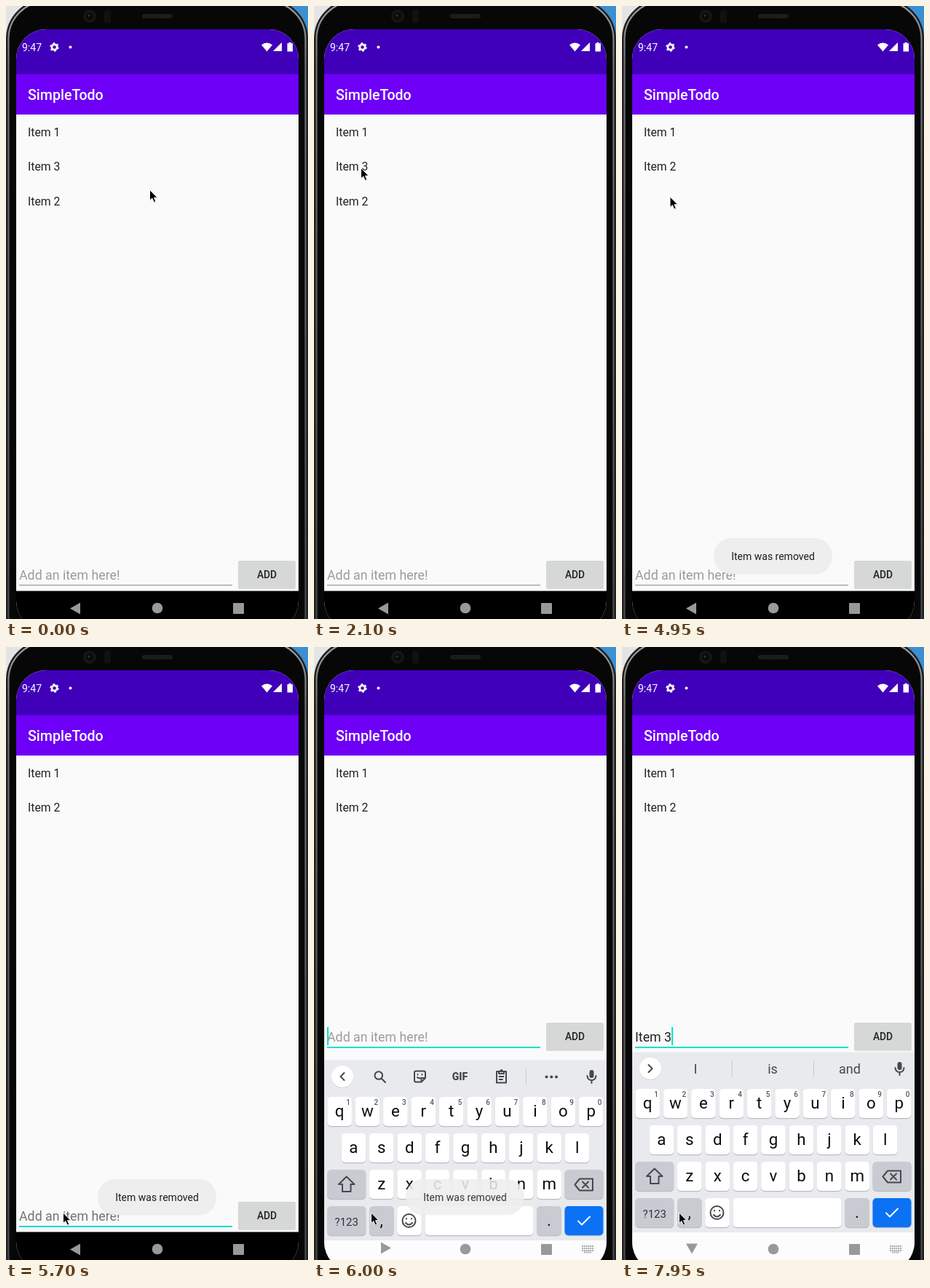
An HTML page for the animation above (8000 ms loop, 415 by 842 pixels).

```html
<!DOCTYPE html>
<html lang="en">
<head>
<meta charset="utf-8">
<title>Todo list demo</title>
<style>
  html, body { margin: 0; width: 100%; height: 100%; overflow: hidden; background: #0a0a0b; }
  svg { display: block; width: 415px; height: 842px; font-family: Roboto, "Noto Sans", sans-serif; }
  text { white-space: pre; }
  .line { fill: none; stroke: #45484c; stroke-width: 2; stroke-linejoin: round; stroke-linecap: round; }
  .mid { text-anchor: middle; }
  .row { font-size: 15.8px; fill: #212121; }
  .field { font-size: 17.8px; }
  .letter { font-size: 22.3px; fill: #0c0c0d; }
</style>
</head>
<body>
<svg viewBox="0 0 415 842">
  <defs>
    <clipPath id="screen"><rect x="14" y="32" width="388" height="826" rx="41"/></clipPath>
    <linearGradient id="desk" x1="0" x2="1" y1="0" y2="0">
      <stop offset=".5" stop-color="#e4e4e4"/><stop offset=".5" stop-color="#3c8fd0"/>
    </linearGradient>
    <linearGradient id="rim" x1="0" x2="0" y1="0" y2="1">
      <stop offset="0" stop-color="#a5a5a5"/><stop offset=".1" stop-color="#737577"/>
      <stop offset="1" stop-color="#46484b"/>
    </linearGradient>
    <linearGradient id="shade" x1="0" x2="0" y1="0" y2="1">
      <stop offset="0" stop-color="#000" stop-opacity=".09"/><stop offset="1" stop-color="#000" stop-opacity="0"/>
    </linearGradient>
  </defs>

  <!-- phone body -->
  <rect width="415" height="842" fill="url(#desk)"/>
  <rect x="413" y="835" width="2" height="7" fill="#b0409a"/>
  <rect x="1.5" y="-8" width="412" height="920" rx="53" fill="#0a0a0b" stroke="#1d1f21" stroke-width="3"/>
  <rect x="3.5" y="-6" width="408" height="916" rx="51" fill="none" stroke="url(#rim)" stroke-width="2"/>
  <rect x="7" y="-3" width="401" height="910" rx="48" fill="#070707"/>
  <circle cx="115" cy="14" r="9" fill="#151516"/>
  <circle cx="115" cy="14" r="5" fill="#0a0a0a"/>
  <circle cx="114" cy="13" r="1.5" fill="#333634"/>
  <rect x="135" y="5" width="9" height="18" rx="4" fill="#111112"/>
  <rect x="187" y="11" width="42" height="6" rx="3" fill="#1e1e1e"/>
  <path d="M190 14H227" stroke="#121212" stroke-width="4" stroke-dasharray="1 3"/>

  <g clip-path="url(#screen)">
    <rect x="14" y="32" width="388" height="826" fill="#fafafa"/>
    <rect x="14" y="32" width="388" height="62" fill="#4000ba"/>
    <rect x="14" y="93.500" width="388" height="55.500" fill="#6e00f7"/>
    <rect x="14" y="149" width="388" height="3" fill="url(#shade)"/>
    <text x="22" y="62" font-size="14" fill="#fff">9:47</text>
    <g fill="none" stroke="#fff">
      <circle cx="66.500" cy="56.500" r="3.600" stroke-width="2.600"/>
      <circle cx="66.500" cy="56.500" r="5.200" stroke-width="2" stroke-dasharray="2.700 2.745"/>
    </g>
    <circle cx="88.500" cy="56.500" r="2" fill="#fff"/>
    <g fill="#fff">
      <path d="M351 53.500Q358.500 47.500 366 53.500L358.500 62.500Z"/>
      <path d="M379 50V62H367Z"/>
      <path d="M388.500 50H391.500V51.300H394V62.500H386.500V51.300H388.500Z"/>
    </g>
    <text x="30" y="129" font-size="19.600" font-weight="500" fill="#fff">SimpleTodo</text>

    <text class="row" x="30" y="178.700">Item 1</text>
    <text class="row" x="30" y="226.200" id="removed">Item 3</text>
    <text class="row" x="30" id="lower">Item 2</text>

    <rect id="navDark" x="14" y="803.500" width="388" height="55" fill="#000"/>

    <g id="entry">
      <text class="field" id="hint" x="18" y="788">Add an item here!</text>
      <text class="field" id="typed" x="18" y="788" fill="#212121"></text>
      <rect id="underline" x="18" width="293"/>
      <rect id="caret" y="768" width="2" height="25" fill="#06dfcc"/>
      <rect x="319" y="763" width="79" height="38" rx="2" fill="#000" opacity=".12"/>
      <rect x="319" y="762" width="79" height="37.500" rx="2" fill="#d6d7d7"/>
      <text class="mid" x="358.500" y="785.500" font-size="13.800" font-weight="500" fill="#212121">ADD</text>
    </g>

    <g id="keyboard">
      <rect x="14" y="556" width="388" height="1" fill="#f1f2f3"/>
      <rect x="14" y="557" width="388" height="248" fill="#e8eaee"/>
      <rect x="14" y="804" width="388" height="150" fill="#fcfcfc"/>
      <circle cx="39" cy="580" r="15" fill="#000" opacity=".1"/>
      <circle cx="39" cy="579" r="15" fill="#fff"/>
      <path id="chevron" class="line" d="M41.500 574L36.500 579L41.500 584"/>
      <g id="tools">
        <path class="line" d="M92.500 581.500L98 587M83.500 577.500a5.300 5.300 0 1 0 10.600 0a5.300 5.300 0 1 0 -10.600 0"/>
        <path class="line" d="M140 571.500H151Q153 571.500 153 573.500V581L147.500 586.500H140Q138 586.500 138 584.500V573.500Q138 571.500 140 571.500ZM153 581H147.500V586.500M142.500 576V576.500M148.500 576V576.500M142 580Q144 582 146 581"/>
        <text class="mid" x="200.500" y="584" font-size="14" font-weight="900" fill="#45484c">GIF</text>
        <path class="line" d="M251 572H264V587.500H251ZM254 572V575H261V572M254.500 579H260.500M254.500 583H259"/>
        <circle cx="257.500" cy="571" r="2" fill="#45484c"/>
        <path d="M291.500 568V590" stroke="#c6c9cd"/>
        <g fill="#45484c"><circle cx="319.500" cy="579.500" r="2"/><circle cx="326.300" cy="579.500" r="2"/><circle cx="333" cy="579.500" r="2"/></g>
      </g>
      <g id="suggestions" class="mid" font-size="18" fill="#45484c">
        <path d="M151 568V591M263.500 568V591" stroke="#c6c9cd"/>
        <text x="101" y="586"></text><text x="207" y="586"></text><text x="313" y="586"></text>
      </g>
      <rect x="378.500" y="570" width="6" height="11" rx="3" fill="#45484c"/>
      <path class="line" d="M375.500 578Q376 584 381.500 584T387.500 578M381.500 584V588"/>
      <g id="keys"></g>
      <path class="line" d="M44.700 716.500L55.500 727H50.500V737H39V727H34Z"/>
      <path class="line" d="M365 719.500H383V735.500H365L358.500 727.500ZM369 723.500L377 731.500M377 723.500L369 731.500"/>
      <circle class="line" cx="130.500" cy="777" r="9"/>
      <path class="line" d="M127 774V774.500M134 774V774.500M126 780Q130.500 785 135 780"/>
      <path class="line" d="M363 777.500L368 782.500L379 771.500" style="stroke:#fff"/>
    </g>

    <g fill="#999">
      <path id="back" d="M-9 0L5 -8V8Z"/>
      <circle cx="208" cy="827" r="7.300"/>
      <rect x="312" y="820" width="15" height="15" rx="1"/>
      <path id="imeSwitch" d="M368 823H384M368 826H384M368 829H384M371 831.500H381" stroke="#a8a8a8" stroke-width="1.800" stroke-dasharray="2 .8"/>
    </g>

    <g id="toast">
      <rect x="126" y="732" width="163" height="49" rx="24" fill="#000" opacity=".03"/>
      <rect x="126" y="731" width="163" height="49" rx="24" fill="#eee"/>
      <text class="mid" x="207.500" y="761" font-size="14" fill="#1c1c1c">Item was removed</text>
    </g>
  </g>

  <g id="pointer">
    <path d="M0 1V15.500L3.500 12.500L6 18L9 17L6.500 11.500H11Z" fill="#000" opacity=".2"/>
    <path d="M0 0V14.500L3.300 11.500L5.700 17L8.300 16L6 10.700H10.500Z" fill="#000" stroke="#fff" stroke-width="1"/>
  </g>
</svg>
<script>
const LOOP = 8000, STEP = 150, ENTRY_LIFT = 246;
const $ = id => document.getElementById(id);
const set = (id, attrs) => Object.entries(attrs).forEach(([k, v]) => $(id).setAttribute(k, v));
const show = (id, on) => set(id, { visibility: on ? 'visible' : 'hidden' });
const clamp01 = v => Math.min(1, Math.max(0, v));
const ramp = (t, from, to) => clamp01((t - from) / (to - from));
const ease = p => p * p * (3 - 2 * p);

// Keyboard layout
const PITCH = 38.4;
function key(x, y, w, label = '', fill = '#fff', style = 'class="letter mid"') {
  return `<rect x="${x}" y="${y + 1.2}" width="${w}" height="40" rx="5" fill="#b9bcc1"/>
    <rect x="${x}" y="${y}" width="${w}" height="40" rx="5" fill="${fill}"/>
    <text ${style} x="${x + w / 2}" y="${y + 27}">${label}</text>`;
}
function keyRow(letters, x, y) {
  return [...letters].map((c, i) => key(x + i * PITCH, y, 33.6, c)).join('');
}
const GREY = '#c8ccd2';
const digits = [...'1234567890'].map((d, i) =>
  `<text class="mid" x="${47 + i * PITCH}" y="618" font-size="10" font-weight="500" fill="#55585c">${d}</text>`).join('');
$('keys').innerHTML =
  keyRow('qwertyuiop', 18.3, 607) + digits +
  keyRow('asdfghjkl', 37.6, 657) +
  key(18.3, 707, 53, '', GREY) + keyRow('zxcvbnm', 76, 707) + key(344.5, 707, 53, '', GREY) +
  key(18.3, 757, 53, '?123', GREY, 'class="mid" font-size="15" fill="#303236"') +
  key(76, 757, 33.6, ',', GREY) + key(114.2, 757, 33.6) + key(152.5, 757, 149) +
  key(306.2, 757, 33.6, '.', GREY) + key(344.5, 757, 53, '', '#0b72f5');

// Pointer stops: time, x, y
const pointerStops = [
  [0, 197.5, 252.5], [300, 76, 286], [450, 58, 280],
  [900, 60, 274], [1050, 65, 256], [1200, 69, 239], [1350, 67, 229], [1500, 65, 223.5], [2100, 64.5, 222.5],
  [4950, 66, 262], [5100, 75, 390], [5250, 83, 540], [5400, 84, 680], [5550, 80, 755], [5700, 78.5, 777]
];
// Typed text and suggestions: time, text, words
const typing = [
  [6000, '', []],
  [6750, 'I', []],
  [7050, 'It', ['It', 'It\u2019s', 'Its']],
  [7200, 'Ite', ['Ite', 'Item', 'Items']],
  [7350, 'Item', ['Item', 'Items', 'Item\u2019s']],
  [7650, 'Item ', ['is', 'in', 'number']],
  [7950, 'Item 3', ['I', 'is', 'and']]
];
const latest = (list, t) => list.filter(e => e[0] <= t).pop();

function render(now) {
  const t = Math.floor((now % LOOP) / STEP) * STEP;

  const [, px, py] = latest(pointerStops, t);
  set('pointer', { transform: `translate(${px} ${py})` });

  set('removed', { opacity: 1 - ramp(t, 4270, 4400) });
  set('lower', { y: 273.7 - 47.5 * ease(ramp(t, 4400, 4640)) });
  set('toast', { opacity: ramp(t, 4450, 4650) * (t < 6000 ? 1 : t < 6150 ? 0.87 : t < 6300 ? 0.35 : 0) });

  const open = t >= 5850, focused = t >= 5700;
  set('entry', { transform: `translate(0 ${open ? -ENTRY_LIFT : 0})` });
  set('hint', { fill: focused && !open ? '#727272' : '#9b9b9b' });
  set('underline', focused ? { y: 795, height: 2, fill: '#06dfcc' } : { y: 795, height: 1, fill: '#8b8b8b' });

  const slide = t < 6000 ? 110 : t < 6150 ? 11 : 0;
  show('keyboard', open);
  show('navDark', !open);
  show('imeSwitch', t >= 6000);
  set('keyboard', { transform: `translate(0 ${slide})` });
  const turn = t < 5850 ? 0 : t < 6000 ? 70 : t < 6150 ? 180 : 270;
  const settled = turn === 270;
  set('back', { transform: `translate(${settled ? 96 : 97} ${settled ? 824.5 : turn ? 825.5 : 827.5}) rotate(${turn})` });

  const [inputAt, value, words] = latest(typing, t) || [Infinity, '', []];
  $('typed').textContent = value;
  show('hint', !value);
  show('caret', t >= inputAt && Math.floor((t - inputAt) / 500) % 2 === 0);
  set('caret', { x: 18 + (value ? $('typed').getComputedTextLength() : 0) });

  const suggesting = words.length > 0;
  set('tools', { display: suggesting ? 'none' : 'inline' });
  set('suggestions', { display: suggesting ? 'inline' : 'none' });
  $('suggestions').querySelectorAll('text').forEach((el, i) => { el.textContent = words[i] || ''; });
  set('chevron', { transform: suggesting ? 'rotate(180 39 579)' : '' });
}

const start = performance.now();
function tick() {
  render(performance.now() - start);
  requestAnimationFrame(tick);
}
tick();
</script>
</body>
</html>
```
